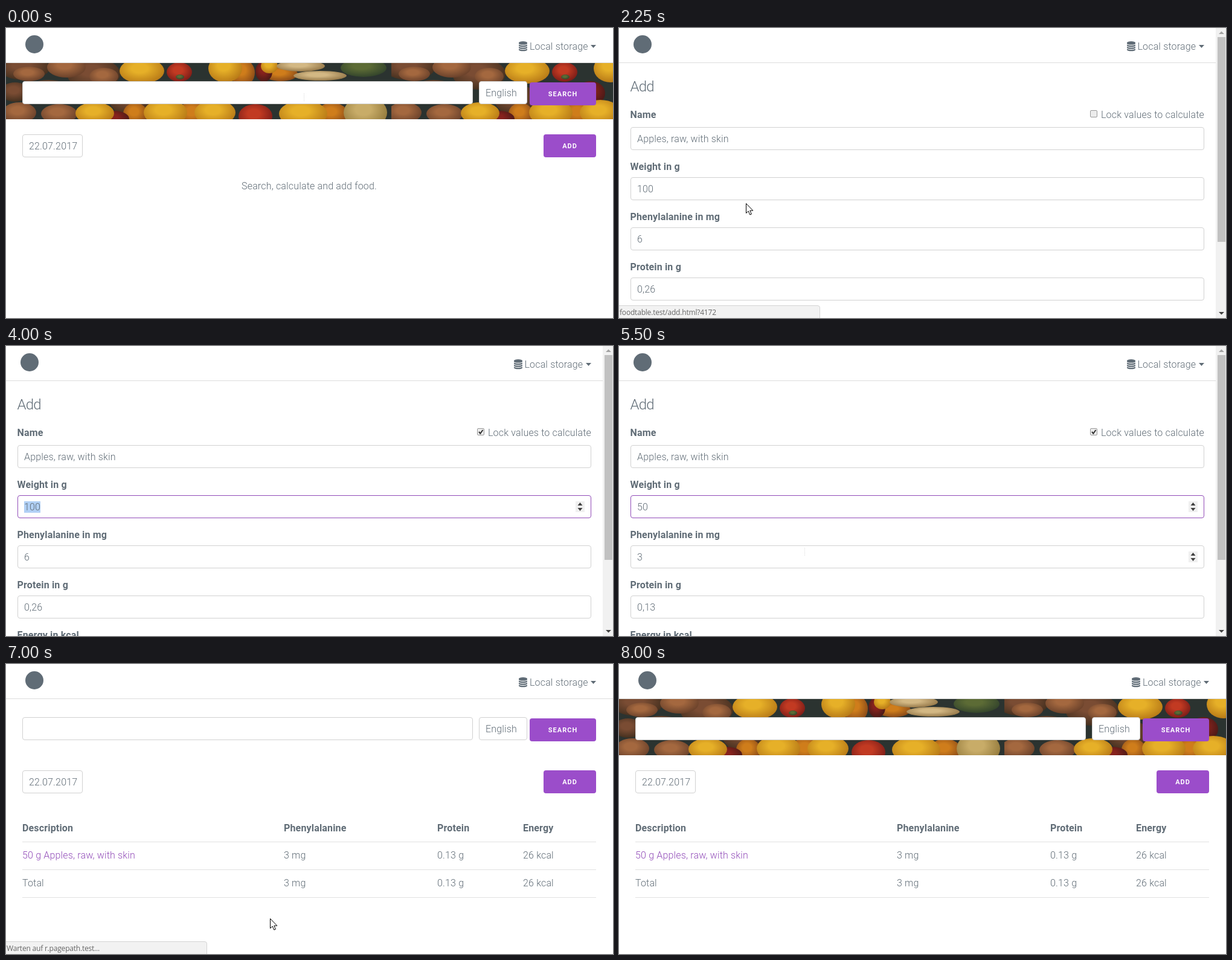
Write an HTML page that moves like this. It is 1005x480 px and loops after 8250 ms.

```html
<!DOCTYPE html>
<html lang="en">
<head>
<meta charset="utf-8">
<title>Food diary</title>
<style>
  html, body { margin: 0; width: 100%; height: 100%; overflow: hidden; background: #fff; }
  #stage { position: relative; width: 1005px; height: 480px; overflow: hidden; background: #fff;
    font: 300 16px/26px Roboto, sans-serif; letter-spacing: .16px; color: #606c76; }
  #stage * { box-sizing: border-box; }
  #stage div, #stage svg { position: absolute; }
  .text { white-space: pre; height: 26px; }
  .bold { font-weight: 700; }
  .link { color: #914bb8; }
  .title { font-size: 24px; letter-spacing: -.8px; }
  .center { left: 0; width: 1004px; text-align: center; }
  .rule { height: 1px; background: #e1e1e1; }
  .field { height: 38px; padding: 0 10px; border: 1px solid #d1d1d1; border-radius: 4px;
    background: #fff; line-height: 38px; white-space: pre; }
  .focus { border-color: #914bb8; }
  .caret { display: inline-block; width: 1px; height: 19px; background: #333; vertical-align: middle; margin-top: -3px; }
  .selected { background: #b1d0f5; }
  .button { height: 38px; border-radius: 4px; background: #9b4dca; color: #fff; text-align: center; }
  .button, .small { font-size: 11px; font-weight: 700; letter-spacing: 1px; line-height: 40px; }
  .small { line-height: 26px; }
  .status { left: -1px; top: 459px; width: 334px; height: 22px; border: 1px solid #d4d4d4; border-radius: 0 4px 0 0;
    background: #f2f2f2; padding-left: 1px; font: 400 12px/22px "Open Sans", sans-serif; letter-spacing: -.2px; white-space: pre; color: #666; }
  .beam { width: 1px; height: 14px; background: repeating-linear-gradient(#dcdcdc 0 1px, #fff 1px 2px); }
</style>
</head>
<body>
<div id="stage"></div>
<script>
const LOOP = 8250;
const stage = document.getElementById('stage');

const text = (x, y, str, cls = '') =>
  `<div class="text ${cls}" style="left:${x}px;top:${y - 12}px">${str}</div>`;
const centered = (y, str) => `<div class="text center" style="top:${y - 12}px">${str}</div>`;
const field = (x, y, w, str, cls = '') =>
  `<div class="field ${cls}" style="left:${x}px;top:${y}px;width:${w}px">${str}</div>`;
const button = (x, y, w, str) =>
  `<div class="button" style="left:${x}px;top:${y}px;width:${w}px">${str}</div>`;
const rect = (x, y, w, h, color) =>
  `<div style="left:${x}px;top:${y}px;width:${w}px;height:${h}px;background:${color}"></div>`;
const rule = (x, y) => `<div class="rule" style="left:${x}px;top:${y}px;width:950px"></div>`;
const svg = (x, y, w, h, body) =>
  `<svg style="left:${x}px;top:${y}px" width="${w}" height="${h}">${body}</svg>`;
const row = (columns, y, cells, cls = '', first = cls) =>
  cells.map((cell, i) => text(columns[i], y, cell, i ? cls : first)).join('');

// Vegetables as shaded ellipses: cx, cy, rx, ry inside one 638 x 94 tile.
const vegetables = [
  ['#7a4c33', '#45301f', [[30, 8, 42, 20], [145, 18, 44, 26], [70, 48, 40, 20], [15, 48, 24, 16], [205, 60, 34, 26]]],
  ['#a4683f', '#6b422b', [[38, 18, 26, 12], [100, 7, 32, 17], [162, 22, 24, 14], [22, 82, 28, 17], [88, 84, 30, 16]]],
  ['#cf7d1b', '#8a4a18', [[392, 16, 20, 22], [310, 84, 26, 20], [455, 18, 28, 12], [214, 84, 20, 18], [540, 84, 26, 18]]],
  ['#86221d', '#4a1a17', [[427, 14, 14, 17], [178, 92, 26, 13], [330, 50, 24, 20]]],
  ['#e6b028', '#b87a17', [[225, 13, 37, 21], [363, 9, 28, 23], [147, 83, 32, 18], [264, 82, 36, 22], [346, 82, 34, 21], [492, 84, 40, 22], [436, 5, 14, 12]]],
  ['#c23a22', '#7d1d18', [[287, 15, 21, 16], [413, 88, 28, 20]]],
  ['#d3b884', '#96794a', [[488, 5, 40, 9], [520, 21, 44, 8]]],
  ['#5c6b35', '#34452c', [[592, 8, 38, 15], [288, 23, 7, 4]]],
  ['#c8ac68', '#947a3c', [[595, 82, 36, 27]]],
];
const tile = vegetables.map(([light, dark, shapes], i) =>
  `<radialGradient id="shade${i}" cx=".45" cy=".4" r=".6"><stop offset=".3" stop-color="${light}"/>
  <stop offset="1" stop-color="${dark}"/></radialGradient><g fill="url(#shade${i})">` +
  shapes.map(([cx, cy, rx, ry]) => `<ellipse cx="${cx}" cy="${cy}" rx="${rx}" ry="${ry}"/>`).join('') + '</g>').join('');
const photo = width => svg(0, 58, width, 93,
  `<defs><pattern id="veg" width="638" height="94" patternUnits="userSpaceOnUse">
  <rect width="638" height="94" fill="#2b3330"/>${tile}</pattern></defs>
  <rect width="100%" height="100%" fill="url(#veg)"/>`);

// A cylinder cut into a lid and three rings.
const database = '<g fill="#606c76"><path d="M0 2.3A7 2.3 0 0 1 14 2.3V3.5A7 2.3 0 0 1 0 3.5z"/>' +
  [0, 3.5, 7].map(y => `<path transform="translate(0 ${y})" d="M0 5.4Q7 8.6 14 5.4V7A7 2.3 0 0 1 0 7z"/>`).join('') + '</g>';

function header(narrow) {
  const right = narrow ? 968.5 : 977;
  return rect(0, 57, narrow ? 988 : 1005, 1, '#dcdcdc') +
    svg(narrow ? 24 : 32, 12, 30, 30, '<circle cx="15" cy="15" r="15" fill="#606c76"/>') +
    svg(right - 128, 22, 14, 17, database) +
    text(right - 110, 30, 'Local storage') +
    svg(right - 9, 28, 10, 6, '<path d="M0 0h9l-4.5 5z" fill="#606c76"/>');
}

function scrollbar(length, offset = 0) {
  return rect(988, 0, 17, 480, '#f1f1f1') + rect(991, 15 + offset, 13, length, '#c1c1c1') +
    svg(993, 5, 9, 5, `<path d="M0 5l4.5-4.5L9 5z" fill="${offset ? '#505050' : '#a3a3a3'}"/>`) +
    svg(993, 470, 9, 5, '<path d="M0 0h9L4.5 4.5z" fill="#404040"/>');
}

function searchBar(s, narrow) {
  const left = narrow ? 19 : 27, right = narrow ? 968 : 977;
  const query = s.query + (s.focus ? '<i class="caret"></i>' : '');
  return (s.photo ? photo(narrow ? 989 : 1005) : '') +
    field(left, 88, right - 204 - left, query, s.focus ? 'focus' : '') +
    field(right - 194, 88, 80, 'English') + button(right - 110, 90, 110, 'SEARCH');
}

function home(s) {
  const columns = [27, 460, 714, 856];
  const table = row(columns, 271, ['Description', 'Phenylalanine', 'Protein', 'Energy'], 'bold') +
    row(columns, 316, ['50 g Apples, raw, with skin', '3 mg', '0.13 g', '26 kcal'], '', 'link') +
    row(columns, 362, ['Total', '3 mg', '0.13 g', '26 kcal']) +
    [294, 340, 386].map(y => rule(27, y)).join('');
  return header(false) + searchBar(s, false) +
    field(27, 176, 100, '22.07.2017') + button(890, 176, 87, 'ADD') +
    (s.logged ? table : centered(261, 'Search, calculate and add food.'));
}

function results(s) {
  const columns = [18.5, 586.5, 745.5, 862.5];
  const foods = [
    ['Apples, raw, with skin', '6 mg', '0.26 g', '52 kcal'],
    ['Apples, raw, without skin', '7 mg', '0.27 g', '48 kcal'],
    ['Croissants, apple', '359 mg', '7.4 g', '254 kcal'],
    ['Strudel, apple', '151 mg', '3.3 g', '274 kcal'],
  ];
  return header(true) + searchBar(s, true) +
    text(18.5, 189, 'Search results', 'title') + text(899, 195, 'CLOSE', 'link small') +
    text(18.5, 258, 'Description', 'bold') +
    ['Phenylalanine', 'Protein', 'Energy'].map((name, i) =>
      text(columns[i + 1], 246, name + ' per', 'bold') + text(columns[i + 1], 271, '100 g', 'bold')).join('') +
    rule(19, 294) +
    foods.map((food, i) => row(columns, 316 + 46 * i, food, '', 'link') + rule(19, 340 + 46 * i)).join('') +
    scrollbar(87);
}

const spinner = y => svg(943, y, 15, 18,
  '<rect width="15" height="18" fill="#f0f0f0"/><path d="M3.5 7l4-5 4 5zM3.5 11h8l-4 5z" fill="#404040"/>');

function checkbox(checked) {
  return svg(780, 136, 13, 13, '<rect x=".5" y=".5" width="11" height="11" rx="1.5" fill="#ececec" stroke="#999"/>' +
    (checked ? '<path d="M3 6l2.3 2.8L9.5 3" fill="none" stroke="#333" stroke-width="2"/>' : ''));
}

function add(s) {
  const [weight, phe, protein, energy] = s.half ? ['50', '3', '0,13', '26'] : ['100', '6', '0,26', '52'];
  const shown = s.selected ? `<span class="selected">${weight}</span>` : weight;
  const inputs = [['Weight in g', shown], ['Phenylalanine in mg', phe], ['Protein in g', protein], ['Energy in kcal', energy]];
  return `<div style="left:0;top:${-s.scroll}px;width:988px;height:640px">` + header(true) +
    text(18.5, 96, 'Add', 'title') + text(18.5, 143, 'Name', 'bold') +
    checkbox(s.locked) + text(798, 143, 'Lock values to calculate') +
    field(19, 164, 950, 'Apples, raw, with skin') +
    inputs.map(([label, value], i) => text(18.5, 229 + 83 * i, label, 'bold') +
      field(19, 247 + 83 * i, 950, value, s.focus && i === 0 ? 'focus' : '')).join('') +
    (s.focus ? spinner(257) : '') + (s.pheHover ? spinner(340) : '') +
    button(19, 560, 87, 'ADD') + '</div>' + scrollbar(339, s.scroll * .707);
}

const arrow = ([x, y]) => svg(x, y, 14, 21,
  '<path d="M.5.5v16l3.7-3.4 2.6 6 2.6-1.1-2.6-5.8h5z" fill="#fff" stroke="#000"/>');
const beam = ([x, y]) => `<div class="beam" style="left:${x}px;top:${y - 7}px"></div>`;
const status = (str, opacity) => `<div class="status" style="opacity:${opacity}">${str}</div>`;

const linkStatus = 'foodtable.test/add.html?4172';
const waitStatus = 'Warten auf r.pagepath.test...';

// Each step lists its start time and what differs from the step before.
const steps = [
  [0, { page: home, photo: true, query: '', beam: [493, 115], statusOpacity: 1, scroll: 0 }],
  [250, { focus: true }],
  [750, { query: 'ap' }],
  [1000, { query: 'apple' }],
  [1250, { page: results }],
  [1750, { beam: null, arrow: [310, 235] }],
  [2000, { arrow: [120, 316], status: linkStatus }],
  [2250, { page: add, focus: false, arrow: [210, 290] }],
  [2500, { arrow: [664, 155], statusOpacity: .85 }],
  [2750, { arrow: [770, 143], status: '' }],
  [3000, { arrow: [785, 141] }],
  [3250, { locked: true }],
  [3500, { arrow: [480, 215] }],
  [3750, { arrow: null, beam: [60, 266], focus: true }],
  [4000, { beam: null, selected: true }],
  [4750, { selected: false, half: true }],
  [5250, { beam: [300, 300] }],
  [5500, { beam: [307, 341], pheHover: true }],
  [5750, { beam: null, pheHover: false, arrow: [307, 380], scroll: 100 }],
  [6000, { scroll: 157, arrow: [190, 410] }],
  [6250, { arrow: [75, 421] }],
  [6500, { page: home, photo: false, focus: false, query: '', scroll: 0, arrow: [260, 421] }],
  [6750, { logged: true, arrow: [437, 421], status: waitStatus, statusOpacity: 1 }],
  [7000, {}],
  [7500, { photo: true }],
  [7750, { status: '' }],
  [8000, { arrow: null }],
];
let state = {};
const scenes = steps.map(([start, change]) => {
  state = { ...state, ...change };
  const html = state.page(state) + (state.status ? status(state.status, state.statusOpacity) : '') +
    (state.beam ? beam(state.beam) : '') + (state.arrow ? arrow(state.arrow) : '');
  return { start, html };
});

let current;
function draw(now) {
  const time = now % LOOP;
  const scene = scenes.findLast(({ start }) => start <= time) || scenes[0];
  if (scene !== current) stage.innerHTML = scene.html;
  current = scene;
  requestAnimationFrame(draw);
}
draw(performance.now());
</script>
</body>
</html>
```
